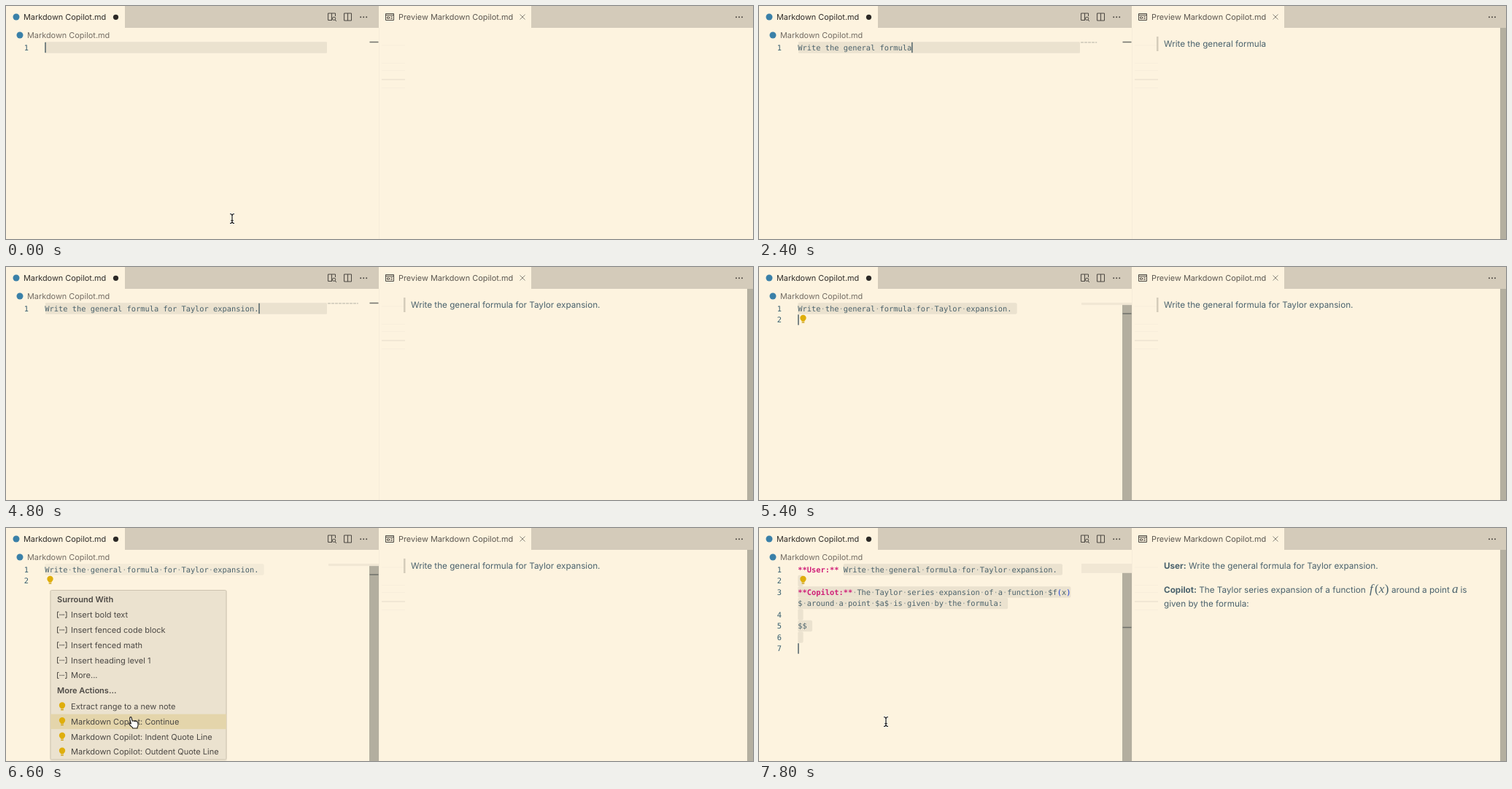
An HTML page for the animation above (8000 ms loop, 1024 by 320 pixels).

```html
<!DOCTYPE html>
<html lang="en">
<head>
<meta charset="utf-8">
<title>Markdown editor with preview</title>
<style>
  html, body { margin: 0; width: 100%; height: 100%; overflow: hidden; background: #fdf3df; }
  svg { display: block; width: 100vw; height: 100vh; }
  text { font: 10.9px Inter, "Open Sans", sans-serif; white-space: pre; text-rendering: geometricPrecision; }
  .code { font: 10.36px "DejaVu Sans Mono", monospace; fill: #4b626b; }
  .num { fill: #365d6e; text-anchor: end; }
  .mark { font-weight: 700; fill: #d01f78; }
  .paren { fill: #1639d6; }
  .dots { fill: #98a09a; }
  .doc { font-size: 11.71px; fill: #4a626d; }
  .doc .b { font-weight: 700; }
  .math { font: 17px "Liberation Serif", serif; fill: #4a626d; }
  .it { font-style: italic; }
  .menu { font-size: 11.04px; fill: #4c4945; }
  .head { font-weight: 600; }
  .icon { fill: none; stroke: #4c4842; }
  .thin { stroke: #6d675f; stroke-width: .8; }
</style>
</head>
<body>
<svg viewBox="0 0 1024 320" preserveAspectRatio="none">
  <rect width="1024" height="320" fill="#fdf3df"/>
  <path d="M163 0H511V30H163ZM720 0H1024V30H720Z" fill="#d4cbba"/>
  <path d="M511.5 30V320" stroke="#f6ecd9"/>
  <path d="M515 54H547M515 78.5H547M515 88.5H547M515 112.5H547" stroke="#f8eedb"/>
  <path d="M515 101H547" stroke="#f1e7d4" stroke-width="2"/>

  <circle cx="14" cy="15" r="4.5" fill="#3a80a8"/>
  <text x="24" y="19.4" fill="#2f2c29">Markdown Copilot.md</text>
  <circle cx="150.5" cy="15.3" r="3.6" fill="#2c2926"/>
  <circle cx="19" cy="40" r="4.5" fill="#3a80a8"/>
  <text x="29" y="44.2" fill="#736c63">Markdown Copilot.md</text>

  <g class="icon">
    <path d="M447 19.5H441.5V10H451.5V14M446.5 10V19.5"/>
    <circle cx="449.6" cy="17.3" r="2.1"/><path d="M451 19L453 21"/>
    <path d="M463.5 10H473.5V20H463.5ZM468.5 10V20"/>
    <path d="M520.5 10.5H531.5V19.5H520.5ZM520.5 12.5H531.5M522.5 14.8H525.5V17.2H522.5ZM527 14.8H530M527 17.2H530"/>
    <path class="thin" d="M704.5 11.5L711.5 18.5M711.5 11.5L704.5 18.5"/>
  </g>
  <g fill="#4c4842">
    <circle cx="486.2" cy="15.3" r="1"/><circle cx="490.2" cy="15.3" r="1"/><circle cx="494.2" cy="15.3" r="1"/>
    <circle cx="1001" cy="15.3" r="1"/><circle cx="1005" cy="15.3" r="1"/><circle cx="1009" cy="15.3" r="1"/>
  </g>
  <text x="538" y="19.4" fill="#5b564f">Preview Markdown Copilot.md</text>
  <g id="scene"></g>
</svg>
<script>
const STEP = 200, STEPS = 40;
const LEFT = 53.3, CHAR = 6.235, ROW = 15.5, WRAP = 60;
const ENTER = 25, SELECT = 26, MENU = 30, SEND = 34;
const ASK = 'Write the general formula for Taylor expansion.';
const REPLY = 'The Taylor series expansion of a function $f(x)$ around a point $a$ ' +
  'is given by the formula:\n\n$$\n';
const USER = '**User:** ', BOT = '**Copilot:** ';
const MENU_ITEMS = ['Surround With', 'Insert bold text', 'Insert fenced code block',
  'Insert fenced math', 'Insert heading level 1', 'More...', 'More Actions...',
  'Extract range to a new note', 'Markdown Copilot: Continue',
  'Markdown Copilot: Indent Quote Line', 'Markdown Copilot: Outdent Quote Line'];
const scene = document.getElementById('scene');

const typed = k => ASK.slice(0, Math.round(2.05 * k));
const streamed = k => REPLY.slice(0, Math.round(REPLY.length * (k - SEND) / (STEPS - 1 - SEND)));
const rowY = row => 57 + ROW * row;
const colX = col => LEFT + CHAR * col;

const rect = (x, y, w, h, fill, more = '') =>
  `<rect x="${x}" y="${y}" width="${w}" height="${h}" fill="${fill}" ${more}/>`;
const label = (x, y, cls, body) => `<text x="${x}" y="${y}" class="${cls}">${body}</text>`;
const span = (cls, body) => `<tspan class="${cls}">${body}</tspan>`;

const bulb = (x, y) => `<g transform="translate(${x} ${y})">
  <path d="M-2 2.4Q-4.2 .8-4.2-1.6A4.2 4.2 0 0 1 4.2-1.6Q4.2 .8 2 2.4V3.2H-2Z" fill="#dfae0c"/>
  <path d="M-1.8 4H1.8V5.3H-1.8Z" fill="#c99a08"/></g>`;

const caret = (col, row) => rect(colX(col) - .1, rowY(row) - 7.2, 1.6, 14.4, '#5c6c70');

const beam = (x, y) => {
  const d = `M${x - 3} ${y - 6.5}Q${x} ${y - 6.5} ${x} ${y - 4}V${y + 4}` +
    `Q${x} ${y + 6.5} ${x - 3} ${y + 6.5}M${x + 3} ${y - 6.5}Q${x} ${y - 6.5} ${x} ${y - 4}` +
    `M${x} ${y + 4}Q${x} ${y + 6.5} ${x + 3} ${y + 6.5}M${x - 1.7} ${y + 2.5}H${x + 1.7}`;
  return `<path d="${d}" fill="none" stroke="#fff" stroke-width="2.4"/>
    <path d="${d}" fill="none" stroke="#1d1b19" stroke-width="1.2"/>`;
};

const hand = (x, y) => `<path transform="translate(${x} ${y}) scale(1.12)" fill="#fff" stroke="#1d1b19"
  stroke-linejoin="round" d="M0 0q1.4-1 1.8.6l1 4q2-.8 2.6.2q1.6-.6 2.2.4q1.6-.3 1.9 1
  l.4 3.2q0 1.6-.9 2.6v1.4h-5.6l-.4-1q-2.4-1.6-4.2-4.2q-.2-1.4 1.2-1.1l1.2.9l-1.4-5.6q-.3-1.4.2-2.4z"/>`;

function pointer(k) {
  if (k === 0) return beam(310, 292);
  if (k < 28) return '';
  if (k === 28) return beam(150, 176);
  if (k >= SEND) return beam(174, 266);
  const [x, y] = { 31: [82.5, 111.5], 32: [128, 196], 33: [170, 260] }[k] || [58, 67];
  return hand(x, y);
}

// Text with its bold speaker tag and coloured brackets.
function paint(text) {
  return text.replace(/^\*\*\w+:\*\*/, m => span('mark', m))
    .replace(/[()]/g, m => span('paren', m));
}

// One visual row; "from" is the first selected column, or -1.
function codeRow(text, row, from, wrapped, fill) {
  const y = rowY(row) + 3.6;
  let out = '';
  if (from >= 0) {
    const end = colX(text.length) + (wrapped ? 0 : 7.3);
    out += rect(colX(from), rowY(row) - 7.7, end - colX(from), ROW, fill, 'rx="2"');
    const dots = [...text].map((c, i) => c === ' ' && i >= from ? '·' : ' ').join('');
    out += label(LEFT, y, 'code dots', dots);
  }
  return out + label(LEFT, y, 'code', paint(text));
}

function editor(k) {
  const sent = k >= SEND, entered = k >= ENTER, selected = k >= SELECT;
  const source = sent ? `${USER}${ASK}\n\n${BOT}${streamed(k)}\n` : typed(k) + (entered ? '\n' : '');
  const lines = source.split('\n');
  const fill = k >= MENU && !sent ? '#f3ead7' : '#ebe2cf';
  let out = '', row = 0;

  if (!selected) out += rect(54, rowY(lines.length - 1) - 7.7, 386, ROW, '#ebe2cf', 'rx="1"');
  lines.forEach((line, i) => {
    const last = i === lines.length - 1;
    const from = !selected || last ? -1 : sent && i === 0 ? USER.length : 0;
    out += label(31, rowY(row) + 3.6, 'code num', i + 1);
    const wraps = line.length > WRAP;
    out += codeRow(line.slice(0, WRAP), row++, from, wraps, fill);
    if (wraps) out += codeRow(line.slice(WRAP), row++, from, false, fill);
  });

  const tail = lines[lines.length - 1].length;
  if (k < MENU || sent) out += caret(tail, row - 1);
  if ((selected && !sent) || k >= 37) out += bulb(60.5, 71.5);

  // Minimap and overview ruler
  if (entered) out += rect(498, 49, 13, 271, '#b3ae9f');
  if (selected) out += rect(442, 49, 69, 1.6 * row, '#f1e7d4');
  else if (tail) out += `<path d="M441 50H${441 + tail * .89}" stroke="#b4b2a5" stroke-dasharray="4 1"/>`;
  out += rect(498.5, 48.8 + 14.5 * (lines.length - 1), 12, 1.5, '#6f706a');
  return out;
}

function preview(k) {
  const p = k === STEPS - 1 ? k : k - k % 2;
  let out = k ? rect(1016, 30, 8, 290, '#b4afa0') : '';
  if (k > 6 && k < SEND) out += rect(545, 42, 2.5, 20, '#d5ccba');
  if (p <= SEND) return out + label(555, 55.8, 'doc', typed(p));

  const r = streamed(p);
  const y = 89.2;
  out += label(555, 55.8, 'doc', span('b', 'User:') + ' ' + ASK);
  out += label(555, y, 'doc', span('b', 'Copilot:') + ' ' + r.slice(0, 42));
  if (r.length >= 48) {
    out += label(837, y, 'math it', 'f') + label(844, y, 'math', '(') +
      label(849.7, y, 'math it', 'x') + label(857.8, y, 'math', ')');
  }
  out += label(867, y, 'doc', r.slice(49, 63));
  if (r.length >= 67) out += label(950, y, 'math it', 'a');
  out += label(961.5, y, 'doc', r.slice(68, 70));
  return out + label(555, 108.3, 'doc', r.slice(71, 92));
}

function menu(k) {
  if (k < MENU || k >= SEND) return '';
  const active = { 32: 5, 33: 8 }[k] || 1;
  let out = rect(60, 86, 243, 234, '#000', 'opacity=".05" rx="2"') +
    rect(61, 85.5, 241, 232.5, '#ebe2cf', 'stroke="#cdc3b0" rx="1.5"');
  MENU_ITEMS.forEach((item, i) => {
    const y = 98 + 20.8 * i + (i > 0 ? .4 : 0) + (i > 6 ? 1 : 0);
    const head = i === 0 || i === 6;
    if (i === active) out += rect(61, y - 10.2, 241, 20.6, '#e4d5ab');
    if (head) out += label(70, y + 3.9, 'menu head', item);
    else {
      out += label(89, y + 3.9, 'menu', item);
      out += i > 6 ? bulb(77, y) : `<path d="M72.5 ${y - 4}H70.5V${y + 4}H72.5M81 ${y - 4}H83V${y + 4}H81"
        class="icon"/><path d="M73.5 ${y}H80" stroke="#55524e" stroke-width="1.4" stroke-dasharray="1.4 1.1"/>`;
    }
  });
  return out;
}

let shown = -1;
function draw(now) {
  const k = Math.floor(now / STEP) % STEPS;
  if (k !== shown) {
    scene.innerHTML = editor(k) + preview(k) + menu(k) + pointer(k);
    shown = k;
  }
}

const start = performance.now();
function tick() {
  draw(performance.now() - start);
  requestAnimationFrame(tick);
}
tick();
</script>
</body>
</html>
```
